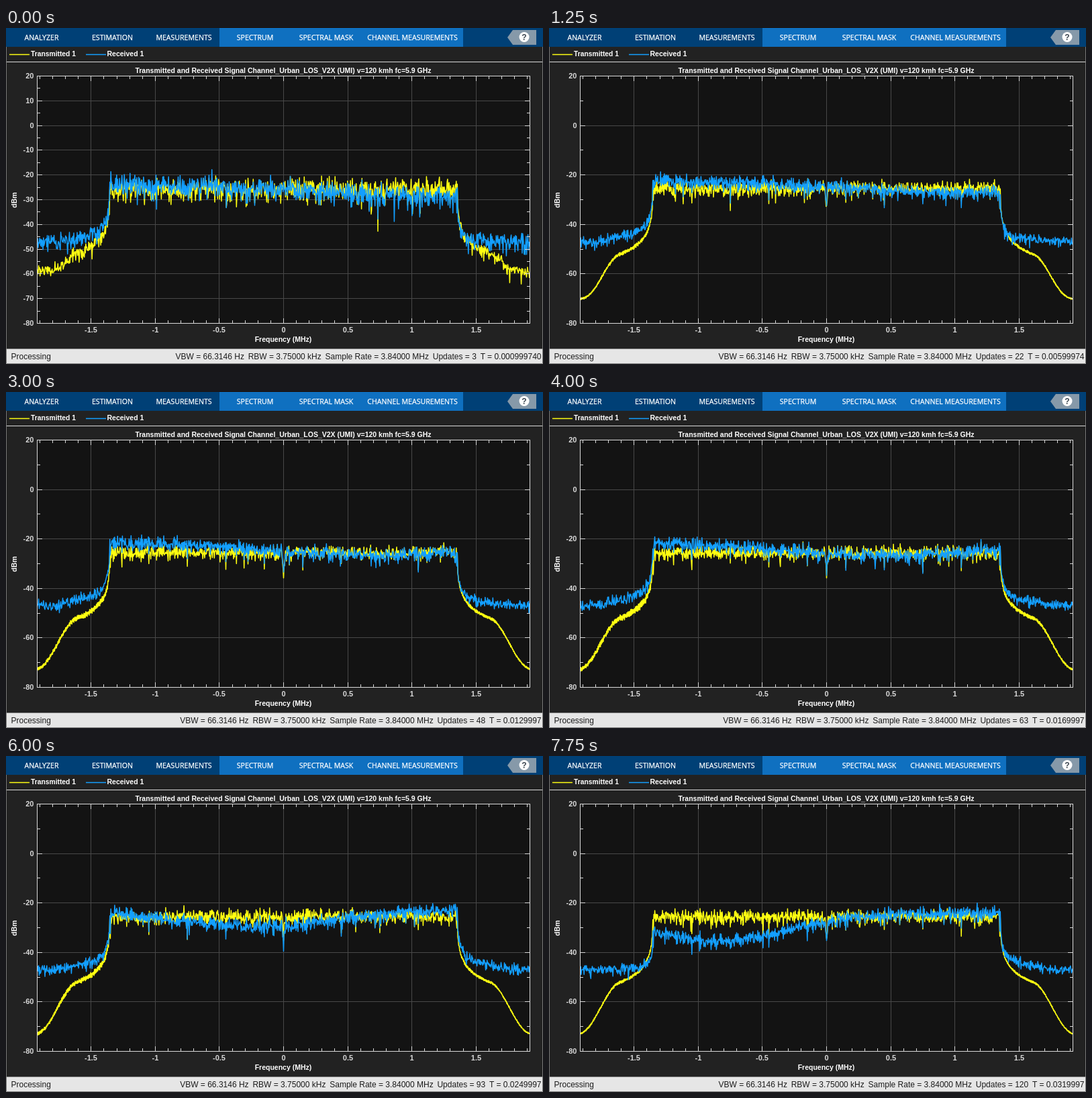
Animation, 800 px wide and 500 px high, one loop 8000 ms. Source, as an HTML page:

```html
<!DOCTYPE html>
<html lang="en">
<head>
<meta charset="utf-8">
<title>Spectrum analyzer</title>
<style>
html, body { margin: 0; width: 100%; height: 100%; overflow: hidden; background: #222; }
svg { display: block; width: 800px; height: 500px; }
.tab { font: 10.6px "Open Sans", "Noto Sans", sans-serif; fill: #fff; stroke: #fff; stroke-width: .25; }
.bold { font: bold 10.5px "Liberation Sans", Arial, sans-serif; fill: #fff; }
.tick { font: bold 11px "Liberation Sans", Arial, sans-serif; fill: #d9d9d9; }
.status { font: 12px "Liberation Sans", Arial, sans-serif; fill: #1c1c1c; }
.line { fill: none; stroke-width: 1.5; stroke-linejoin: round; }
.sent { stroke: #ffff11; }
.got { stroke: #139fff; }
.mid { text-anchor: middle; }
.end { text-anchor: end; }
</style>
</head>
<body>
<svg viewBox="0 0 800 500">
  <rect width="800" height="28" fill="#004076"/>
  <rect x="318" width="363" height="28" fill="#0f70c0"/>
  <g id="tabs"></g>
  <path d="M747 14L755 3H790V25H755Z" fill="#8699a9"/>
  <circle cx="772" cy="13.5" r="7.5" fill="#fff"/>
  <text class="bold mid" x="772" y="17.7" style="font-size:12px;fill:#3c4650">?</text>

  <rect y="28" width="800" height="450" fill="#222"/>
  <path d="M0 50.5H800" stroke="#d9d9d9"/>
  <path class="line sent" d="M5 39.5H35"/>
  <path class="line got" d="M119 39.5H149"/>
  <text class="bold" x="37" y="42" style="font-size:10.3px">Transmitted 1</text>
  <text class="bold" x="150.5" y="42">Received 1</text>

  <rect x="46.5" y="71.5" width="734" height="368" fill="#131313"/>
  <path id="grid" stroke="#484848" fill="none"/>
  <path id="sent" class="line sent"/>
  <path id="got" class="line got"/>
  <path id="ticks" stroke="#d9d9d9" fill="none"/>
  <rect x="46.5" y="71.5" width="734" height="368" fill="none" stroke="#d9d9d9"/>
  <g id="labels"></g>
  <text class="bold mid" x="413" y="66.5">Transmitted and Received Signal Channel_Urban_LOS_V2X (UMI) v=120 kmh fc=5.9 GHz</text>
  <text class="bold mid" x="413" y="467">Frequency (MHz)</text>
  <text class="bold mid" transform="translate(16 256) rotate(-90)">dBm</text>

  <rect y="478" width="800" height="22" fill="#e6e6e6"/>
  <path d="M0 477.5H800" stroke="#8a8a8a"/>
  <text class="status" x="7.5" y="493">Processing</text>
  <text class="status end" id="info" x="797.5" y="493"></text>
  <path d="M.5 28V499.5H799.5V28" fill="none" stroke="#777"/>
</svg>
<script>
const $ = id => document.getElementById(id);
const STEP = 250, STEPS = 32, BINS = 1024, BAND = 1.355, LEVEL = -25.4;
const px = f => 413.5 + f * 191.15;
const py = db => 71.5 + (20 - db) * 3.68;
const addPower = (a, b) => 10 * Math.log10(10 ** (a / 10) + 10 ** (b / 10));

function smooth(u) {
  u = Math.min(1, Math.max(0, u));
  return u * u * (3 - 2 * u);
}

function random(seed) {
  let s = seed;
  return () => {
    s = s + 0x6D2B79F5 | 0;
    let t = Math.imul(s ^ s >>> 15, 1 | s);
    t = t + Math.imul(t ^ t >>> 7, 61 | t) ^ t;
    return ((t ^ t >>> 14) >>> 0) / 4294967296;
  };
}

// power of k averaged periodograms, in dB
function averaged(rnd, k) {
  let sum = 0;
  for (let i = 0; i < k; i++) sum -= Math.log(rnd() + 1e-6);
  return 10 * Math.log10(sum / k);
}

// filter slope, d pixels beyond the band edge
const skirt = d => -31 - 5.4 * Math.log(1 + d) - 19 * smooth((d - 50) / 62);

// received level: a fade that drifts left, narrows and deepens
function channel(f, u) {
  const centre = 1.2 - 2.05 * u ** 1.5;
  const width = 1 - .45 * u;
  const depth = 5 + 6 * u ** 4;
  const top = -23 + 2 * Math.sin(Math.PI * u) - u ** 4;
  return top - depth * Math.exp(-(((f - centre) / width) ** 2) / 2);
}

// a dip at zero and narrow ones at odd multiples of 0.15 MHz
function notch(bin) {
  const dc = 8.5 * Math.exp(-((bin / 2) ** 2));
  return Math.abs(bin) % 80 === 40 ? 5 : dc;
}

function traces(n) {
  const rnd = random(n * 7919 + 17);
  const u = n / (STEPS - 1), k = Math.min(9, 3 + n * 2);
  const floor = -77 + 18 * Math.exp(-n / 4);
  const rippleLeft = .7 + rnd(), rippleRight = .3 + rnd();
  let sent = "", got = "";
  for (let i = 0; i < BINS; i++) {
    const bin = i - BINS / 2, f = bin * .00375;
    const beyond = (Math.abs(f) - BAND) * 191.15;
    const common = averaged(rnd, k), own = averaged(rnd, k);
    const zigzag = (i % 2 ? 1 : -1) * (.3 + .9 * rnd());
    let a, b;
    if (beyond < 0) {
      const dip = n ? notch(bin) : 0;
      a = LEVEL + .9 * common + 1.1 * zigzag - dip;
      b = channel(f, u) + .6 * common + .6 * own + zigzag - .9 * dip;
    } else {
      const ripple = (f < 0 ? rippleLeft : rippleRight) * (1 - beyond / 200);
      const gain = channel(Math.sign(f) * BAND, u) - LEVEL;
      a = addPower(skirt(beyond), floor) + ripple * zigzag + .5 * common * Math.exp(-n / 2);
      b = addPower(skirt(beyond) + gain, -46.8) + .7 * own + .6 * zigzag;
    }
    const cmd = (i ? "L" : "M") + px(f).toFixed(1) + " ";
    sent += cmd + py(a).toFixed(1);
    got += cmd + py(b).toFixed(1);
  }
  $("sent").setAttribute("d", sent);
  $("got").setAttribute("d", got);
}

const text = (cls, x, y, s) => `<text class="${cls}" x="${x}" y="${y}">${s}</text>`;

function axes(gap) {
  let grid = "", ticks = "", labels = "";
  for (let i = -19; i <= 19; i++) {
    const x = Math.floor(px(i / 10)) + .5, major = i % 5 === 0, len = major ? 7 : 4;
    ticks += `M${x} 72v${len}M${x} 439v${-len}`;
    if (!major) continue;
    grid += `M${x} 72V439`;
    if (Math.abs(i) < 19) labels += text("tick mid", x, 453, i / 10);
  }
  for (let db = 20; db >= -80; db -= gap / 2) {
    const y = Math.floor(py(db)) + .5, major = db % gap === 0, len = major ? 7 : 4;
    ticks += `M47 ${y}h${len}M780 ${y}h${-len}`;
    if (!major) continue;
    grid += `M47 ${y}H780`;
    labels += text("tick end", 41.5, y + 3.5, db);
  }
  $("grid").setAttribute("d", grid);
  $("ticks").setAttribute("d", ticks);
  $("labels").innerHTML = labels;
}

function status(n) {
  const time = ((n + 1) / 1000 - 2.6e-7).toPrecision(6);
  const parts = ["VBW = 66.3146 Hz", "RBW = 3.75000 kHz", "Sample Rate = 3.84000 MHz",
    "Updates = " + Math.floor((n + 1) * 3.75), "T = " + time];
  $("info").innerHTML = parts.map((p, i) => `<tspan dx="${i ? 5.8 : 0}">${p}</tspan>`).join("");
}

$("tabs").innerHTML = [["ANALYZER", 53], ["ESTIMATION", 158.5], ["MEASUREMENTS", 265], ["SPECTRUM", 371],
  ["SPECTRAL MASK", 477], ["CHANNEL MEASUREMENTS", 605.5]].map(([s, x]) => text("tab mid", x, 18, s)).join("");

let shown = -1;
function draw(ms) {
  const n = Math.floor(ms / STEP) % STEPS;
  if (n === shown) return;
  shown = n;
  axes(n ? 20 : 10);
  traces(n);
  status(n);
}

function tick() {
  draw(performance.now());
  requestAnimationFrame(tick);
}
tick();
</script>
</body>
</html>
```
